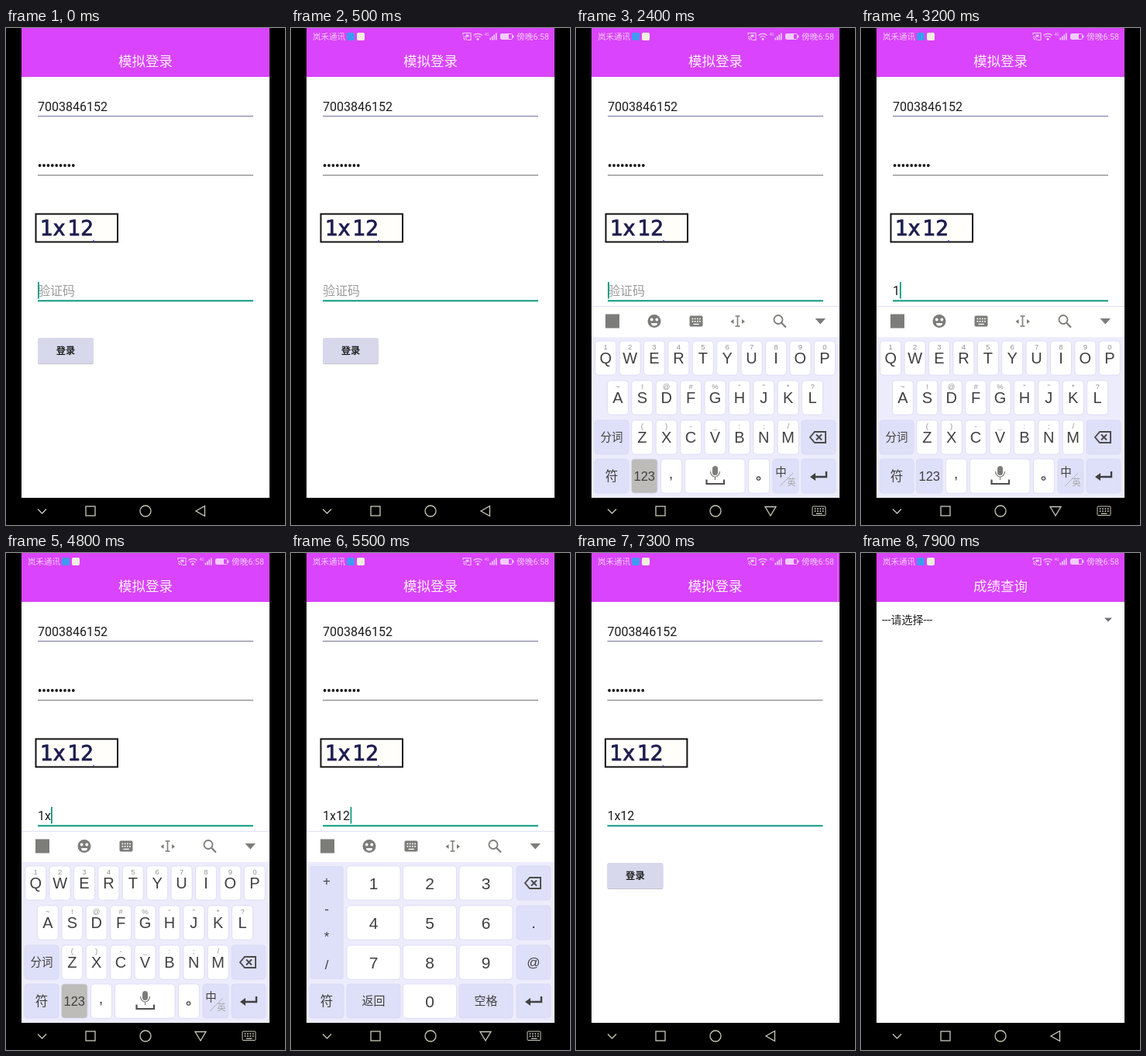
Animation, 360 px wide and 640 px high, one loop 8 s. Source, as an HTML page:

```html
<!DOCTYPE html>
<html lang="zh">
<head>
<meta charset="utf-8">
<style>
html, body { margin: 0; width: 100%; height: 100%; overflow: hidden; background: #000; }
svg { display: block; width: 100vw; height: 100vh; }
text { font-family: Roboto, "Noto Sans CJK SC", "Noto Sans CJK", sans-serif; white-space: pre; }
.key { font-family: "Liberation Sans", "Noto Sans CJK SC", "Noto Sans CJK", sans-serif; font-weight: 500; }
.captcha { font-family: "DejaVu Sans", sans-serif; }
</style>
</head>
<body>
<svg id="stage" viewBox="0 0 360 640"></svg>
<script>
const LOOP = 8000, PURPLE = '#d944fc', TEAL = '#0b9a80', INK = '#1c1c1c', GREY = '#7c7c78';
const WHITE_KEY = '#fff', SIDE_KEY = '#dedff8', PRESSED = '#bdbcb8', BUTTON = '#d8d8ec', LABEL = '#404042';

const rect = (x, y, w, h, fill, extra = '') =>
  `<rect x="${x}" y="${y}" width="${w}" height="${h}" fill="${fill}" ${extra}/>`;
const text = (x, y, s, size, fill, extra = '') =>
  `<text x="${x}" y="${y}" font-size="${size}" fill="${fill}" ${extra}>${s}</text>`;
const mid = (x, y, s, size, fill, extra = '') => text(x, y, s, size, fill, `text-anchor="middle" ${extra}`);
const line = (d, color, w = 1.3) => `<path d="${d}" fill="none" stroke="${color}" stroke-width="${w}"/>`;
const shape = (d, fill) => `<path d="${d}" fill="${fill}"/>`;
const disc = (x, y, r, fill) => `<circle cx="${x}" cy="${y}" r="${r}" fill="${fill}"/>`;
const ring = (x, y, r, color, w) =>
  `<circle cx="${x}" cy="${y}" r="${r}" fill="none" stroke="${color}" stroke-width="${w}"/>`;
const group = (id, body) => `<g id="${id}">${body}</g>`;

// A key: position, label, label size, hint above, resting colour
function key(id, x, y, w, label = '', size = 20, hint = '', fill = WHITE_KEY, h = 44) {
  const c = x + w / 2;
  return rect(x, y, w, h, fill, `id="${id}" rx="4" stroke="#d8d9f4" stroke-width=".8"`) +
    mid(c, y + h / 2 + size * .36, label, size, LABEL, 'class="key"') +
    mid(c, y + 11, hint, 9.5, '#929292', 'class="key"');
}
const keyRow = (letters, hints, x, y) => [...letters].map((ch, i) =>
  key('k' + ch, x + 31.4 * i, y, 27, ch, 20, hints[i])).join('');

const backspace = line('M302 527l6-7h14v14h-14zM310 523.5l7 7m0-7l-7 7', '#4a4a4a', 1.9);
const enter = line('M323 571v7h-17', '#404040', 2.4) + shape('M302 578l7-5v10z', '#404040');

function letterPad() {
  return keyRow('QWERTYUIOP', '1234567890', 24.7, 403) +
    keyRow('ASDFGHJKL', '~!@#%“”*?', 40.4, 454) +
    key('split', 24, 505, 44, '分词', 14.5, '', SIDE_KEY) +
    keyRow('ZXCVBNM', '()-_:;/', 71.8, 505) +
    key('del', 291, 505, 44, '', 1, '', SIDE_KEY) + backspace +
    key('sym', 24, 555, 44, '符', 16.5, '', SIDE_KEY) +
    key('num', 71.5, 555, 33.5, '123', 16.5, '', SIDE_KEY) +
    key('comma', 109.5, 555, 27) + mid(122.5, 580, ',', 20, LABEL, 'class="key"') +
    key('space', 140.5, 555, 77.5) +
    rect(176, 564, 7, 12, GREY, 'rx="3.5"') +
    line('M173.5 571a6 7 0 0 0 12 0M179.5 578v4', GREY, 1.2) + line('M168.5 581.5v5.500h22.500v-5.500', '#505050', 2.2) +
    key('stop', 222.5, 555, 27) + ring(235.5, 580, 2.2, LABEL, 1.2) +
    key('lang', 254, 555, 33, '', 1, '', SIDE_KEY) +
    mid(264.5, 577, '中', 14.5, LABEL, 'font-weight="500"') + mid(278, 589, '英', 11, '#a5a5a5') +
    line('M263 590l17-17', '#a5a5a5', .8) +
    key('enter', 291, 555, 44, '', 1, '', SIDE_KEY) + enter;
}

function numberPad() {
  let s = rect(24, 403, 44, 146, SIDE_KEY, 'rx="4"');
  ['+', '-', '*', '/'].forEach((c, i) => s += mid(46, 428 + 36 * i, c, 17, LABEL, 'class="key"'));
  for (let i = 0; i < 9; i++)
    s += key('n' + (i + 1), 72 + 72.5 * (i % 3), 403 + 51 * (i / 3 | 0), 69, i + 1, 21);
  return s + key('ndel', 291, 403, 44, '', 1, '', SIDE_KEY) +
    `<g transform="translate(0 -102)">${backspace}</g>` +
    key('dot', 291, 454, 44, '.', 20, '', SIDE_KEY) + key('at', 291, 505, 44, '@', 17, '', SIDE_KEY) +
    key('nsym', 24, 555, 44, '符', 16.5, '', SIDE_KEY) + key('back', 72, 555, 69, '返回', 15, '', SIDE_KEY) +
    key('n0', 144.5, 555, 69, '0', 21) + key('nspace', 217, 555, 69, '空格', 15, '', SIDE_KEY) +
    key('nenter', 291, 555, 44, '', 1, '', SIDE_KEY) + enter;
}

// Small keyboard glyph drawn from a rectangle and rows of dots
function boardIcon(x, y, w, h, color, filled) {
  const dots = filled ? '#fff' : color;
  let s = rect(x, y, w, h, filled ? color : 'none', `rx="1" stroke="${color}"`);
  for (let i = 0; i < 8; i++)
    s += rect(x + w * (.16 + .2 * (i % 4)), y + h * (.2 + .26 * (i >> 2)), 1.7, 1.7, dots);
  return s + rect(x + w * .28, y + h * .75, w * .46, 1.3, dots);
}

const toolbar = rect(20, 358, 320, 40, '#fff') + rect(20, 358, 320, 1, '#dfe0f8') +
  rect(38, 368.5, 18, 18, GREY) +
  disc(101, 377.5, 8.5, GREY) + disc(97.7, 375.5, 1.9, '#fff') + disc(104.3, 375.5, 1.9, '#fff') +
  shape('M97 380h8a4 3.500 0 0 1-8 0z', '#fff') +
  boardIcon(147, 371, 16, 13, GREY, true) +
  line('M205.5 371h6m-3 0v13m-3 0h6', GREY, 1.6) + shape('M199.5 378l4-3v6zM218 378l-4-3v6z', GREY) +
  ring(261, 375.5, 5.5, GREY, 1.8) + line('M265 379.5l6 6', GREY, 2.2) +
  rect(294, 361, 43, 35, 'none', 'id="hide" rx="3"') + shape('M308.5 374h13.500l-6.700 7.500z', GREY);

const dots = Array.from({ length: 9 }, (_, i) => disc(43.6 + 5.4 * i, 177, 1.9, INK)).join('');

const page = title => rect(20, 0, 320, 605, '#fff') + rect(20, 0, 320, 63, PURPLE) +
  mid(180, 49, title, 17.5, '#fff0ff');

const loginPage = page('模拟登录') +
  text(41, 107, '7003846152', 16, INK) + rect(41, 113, 278, 1, '#77779c') +
  dots + rect(41, 189, 278, 1, '#787878') +
  rect(38.5, 239.5, 105.5, 36, '#fffefa', 'stroke="#111" stroke-width="2"') +
  ['1x', '12'].map((s, i) => text(44 + 35.5 * i, 266.5, s, 26.5, '#1d1d50',
    'class="captcha" stroke="#1d1d50" stroke-width=".8"')).join('') +
  rect(112, 273, 2, 2, '#6b6bd0') +
  text(41, 344, '', 16, INK, 'id="code"') + text(41, 344, '验证码', 16, '#9b9b9b', 'id="hint"') +
  rect(41, 327, 1.8, 21.5, TEAL, 'id="caret"') + rect(41, 350.3, 278, 2, TEAL) +
  rect(41, 400, 72, 33, '#c2c2cc', 'rx="2"') + rect(41, 399, 72, 33, BUTTON, 'id="login" rx="2"') +
  mid(77, 420, '登录', 12.3, '#222', 'font-weight="700"');

const scorePage = page('成绩查询') + text(27, 91, '---请选择---', 14, '#222') +
  shape('M314 83.5h10l-5 5z', '#70707c');

const PALE = '#f2ccff';
const bars = [0, 1, 2, 3].map(i => rect(256.5 + 2.5 * i, 12.5 - 2 * i, 1.6, 3 + 2 * i, PALE)).join('');
const status = text(28, 15, '岚禾通讯', 10.5, PALE) +
  rect(72, 6, 10, 10, '#3f9bf0', 'rx="2"') + rect(85, 6, 10, 10, '#f1eee0', 'rx="2"') +
  line('M222 9v-2.500h10v9h-4.500M222 11a4.500 4.500 0 0 1 4.500 4.500M222 13.200a2.300 2.300 0 0 1 2.300 2.300', PALE, 1.1) +
  rect(225.5, 8.5, 4, 3, PALE) +
  line('M235.5 9.500a8 8 0 0 1 11 0M237.5 12a5 5 0 0 1 7 0', PALE, 1.3) +
  disc(241, 14.2, 1.5, PALE) + text(249.5, 10, '4G', 5, PALE) + bars +
  rect(270.5, 7.5, 15, 7, 'none', `rx="1" stroke="${PALE}"`) + rect(271, 8, 10, 6, PALE) +
  rect(286, 9.5, 1.5, 3, PALE) + text(333, 15, '傍晚6:58', 10.7, PALE, 'text-anchor="end"');

const NAV = '#c9c9b8';
const nav = rect(0, 605, 360, 35, '#000') + line('M41 619.5l5.500 5.500l5.500-5.500', NAV) +
  rect(103, 616, 12, 12, 'none', `stroke="${NAV}" stroke-width="1.3"`) + ring(180, 622, 7, NAV, 1.3) +
  group('navBack', line('M245 622l11.500-6.500v13z', NAV)) +
  group('navIme', line('M244 616.5h14l-7 11.500z', NAV) + boardIcon(305, 616, 17, 11.5, NAV, false));

document.getElementById('stage').innerHTML =
  '<clipPath id="screen"><rect x="20" width="320" height="605"/></clipPath>' +
  rect(0, 0, 360, 640, '#000') +
  `<g clip-path="url(#screen)">${group('old', loginPage)}${group('next', scorePage)}${group('status', status)}${
    group('board', rect(20, 398, 320, 207, '#ececfc') + toolbar + group('letters', letterPad()) +
      group('numbers', numberPad()))}</g>` + nav;

const $ = id => document.getElementById(id);
const within = (t, spans) => spans.some(([a, b]) => t >= a && t < b);
const ramp = (t, a, b) => Math.min(1, Math.max(0, (t - a) / (b - a)));
const easeOut = p => 1 - (1 - p) ** 3;
const show = (id, on) => $(id).setAttribute('display', on ? 'inline' : 'none');
const move = (id, x, y) => $(id).setAttribute('transform', `translate(${x} ${y})`);

const typed = [[3000, '1'], [3700, '1x'], [5300, '1x1'], [5500, '1x12']];
const caretX = [41, 50, 58, 67, 76.5];
const caretOn = [[0, 500], [1000, 1500], [2000, 2500], [3000, 3500], [3700, 4200],
  [4700, 5200], [5300, 6300], [6700, 7200]];
const presses = [
  ['num', SIDE_KEY, [[2400, 2500], [4800, 4900]]],
  ['kX', WHITE_KEY, [[3600, 3700]]],
  ['n1', WHITE_KEY, [[2900, 3000], [5100, 5300]]],
  ['n2', WHITE_KEY, [[5400, 5500]]],
  ['hide', 'none', [[6100, 6300]]],
  ['login', BUTTON, [[6900, 7200]]]
];

function draw(t) {
  const code = typed.reduce((s, [at, v]) => t >= at ? v : s, '');
  $('code').textContent = code;
  show('hint', !code);
  show('caret', within(t, caretOn));
  $('caret').setAttribute('x', caretX[code.length]);
  for (const [id, rest, spans] of presses) $(id).setAttribute('fill', within(t, spans) ? PRESSED : rest);

  const ime = t >= 1500 && t < 6400;
  show('navIme', ime);
  show('navBack', !ime);
  show('board', ime);
  const down = t < 6000 ? 1 - easeOut(ramp(t, 1500, 1900)) : ramp(t, 6200, 6400) ** 2;
  move('board', 0, 247 * down);
  const digits = within(t, [[2500, 3200], [4900, 6400]]);
  show('numbers', digits);
  show('letters', !digits);

  $('status').setAttribute('opacity', ramp(t, 100, 400));
  const turn = easeOut(ramp(t, 7300, 7700));
  move('old', -80 * turn, 0);
  move('next', 320 * (1 - turn), 0);
}

function tick() {
  draw(performance.now() % LOOP);
  requestAnimationFrame(tick);
}
tick();
</script>
</body>
</html>
```
